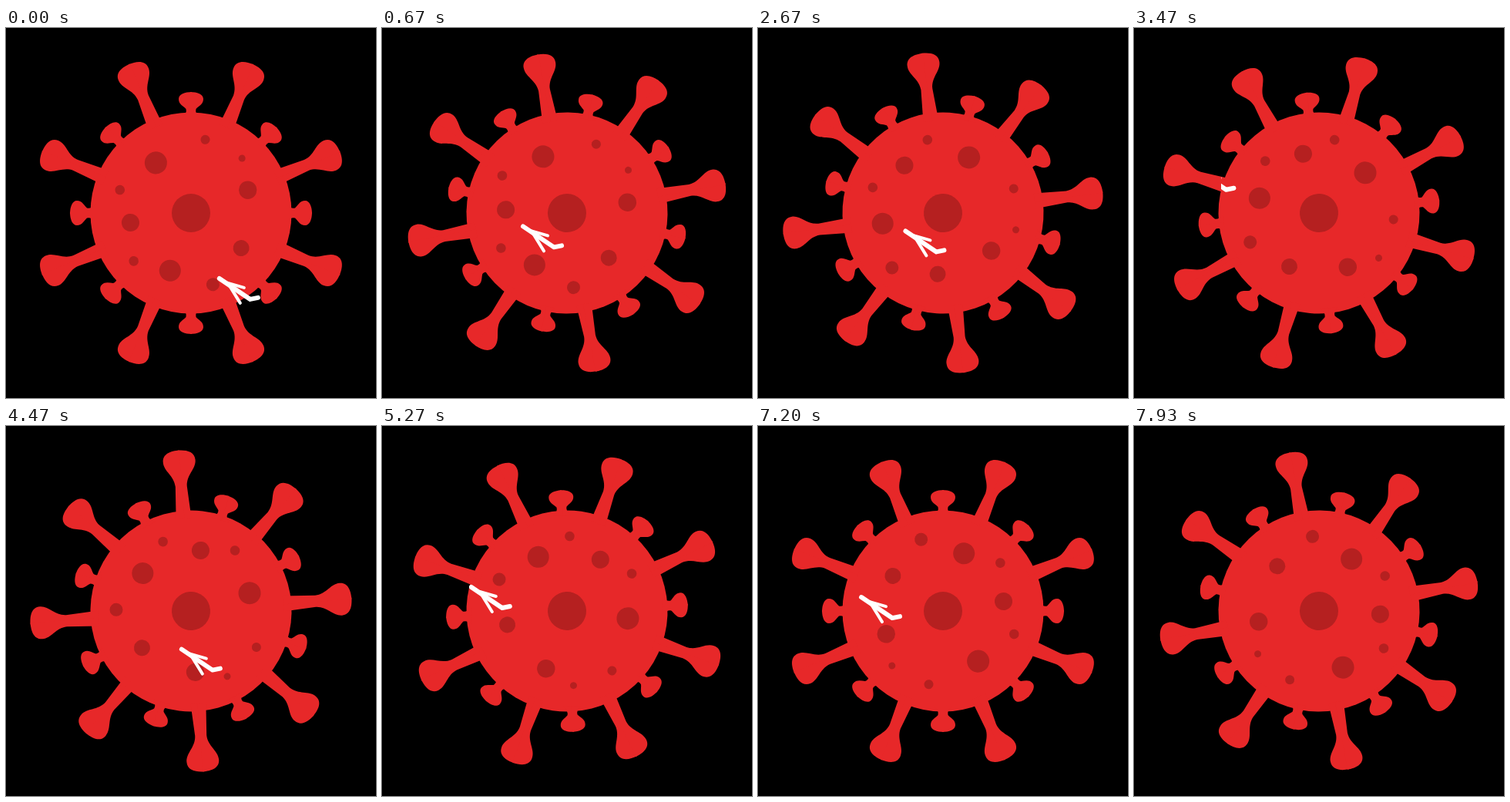
An HTML page for the animation above (8000 ms loop, 480 by 480 pixels).

```html
<!DOCTYPE html>
<html lang="en">
<head>
<meta charset="utf-8">
<title>Virus and plane</title>
<style>
  html, body { margin: 0; width: 100%; height: 100%; overflow: hidden; background: #000; }
  svg { display: block; width: 100%; height: 100%; }
</style>
</head>
<body>
<svg viewBox="0 0 480 480">
  <defs>
    <!-- each spike is one half, mirrored -->
    <path id="longHalf" d="M-1 -120 H10 L7.500 -162 C8 -177 21 -183 21 -195 C21 -206 10 -209 -1 -209Z"/>
    <path id="shortHalf" d="M-1 -124 H11 Q5 -130 6.500 -135 C10 -139 16 -141 16 -148 C16 -154 8 -157 -1 -157Z"/>
    <g id="long"><use href="#longHalf"/><use href="#longHalf" transform="scale(-1 1)"/></g>
    <g id="short"><use href="#shortHalf"/><use href="#shortHalf" transform="scale(-1 1)"/></g>
    <clipPath id="window"><rect x="113" width="367" height="480"/></clipPath>
  </defs>
  <g transform="translate(240 240)">
    <g id="virus" fill="#e72829"><circle r="130.500"/></g>
  </g>
  <g clip-path="url(#window)">
    <g id="plane" fill="none" stroke="#fff" stroke-linecap="round" stroke-linejoin="round">
      <path d="M3 3 L43 30 L53 28" stroke-width="6"/>
      <path d="M35 15 L14 9 L30 35" stroke-width="4"/>
    </g>
  </g>
</svg>
<script>
const LOOP = 8000;
const STEP = 480, STEP_LEAD = 25, STEP_ANGLE = 12;
const FLIGHT = 2060, SPEED = 0.14, SLOPE = 0.72;
const svgNS = 'http://www.w3.org/2000/svg';
const virus = document.getElementById('virus');
const plane = document.getElementById('plane');

function add(tag, angle, attrs) {
  const el = document.createElementNS(svgNS, tag);
  for (const key in attrs) el.setAttribute(key, attrs[key]);
  el.setAttribute('transform', `rotate(${angle})`);
  virus.append(el);
}

function addSpot(angle, r, cx) {
  add('circle', angle, { r, cx, fill: '#b52020' });
}

for (let angle = 0; angle < 360; angle += 45) {
  add('use', angle, { href: '#short' });
  add('use', angle + 22.5, { href: '#long' });
}

// angle: radius; small spots sit further out
const spots = {
  35: 10.5, 73: 8.5, 110: 14, 140: 6.3, 171: 11.5,
  198: 6.3, 235: 14.5, 281: 6, 313: 4.5, 338: 11.7
};
addSpot(0, 25, 0);
for (const angle in spots) addSpot(angle, spots[angle], spots[angle] > 9 ? 79.5 : 97);

function draw(t) {
  const turn = Math.floor((t + STEP_LEAD) / STEP) * STEP_ANGLE;
  virus.setAttribute('transform', `rotate(${turn})`);

  const dx = (t % FLIGHT) * SPEED;
  plane.setAttribute('transform', `translate(${274 - dx} ${322 - dx * SLOPE})`);
}

const origin = performance.now();
function tick() {
  draw((performance.now() - origin) % LOOP);
  requestAnimationFrame(tick);
}
draw(0);
requestAnimationFrame(tick);
</script>
</body>
</html>
```
